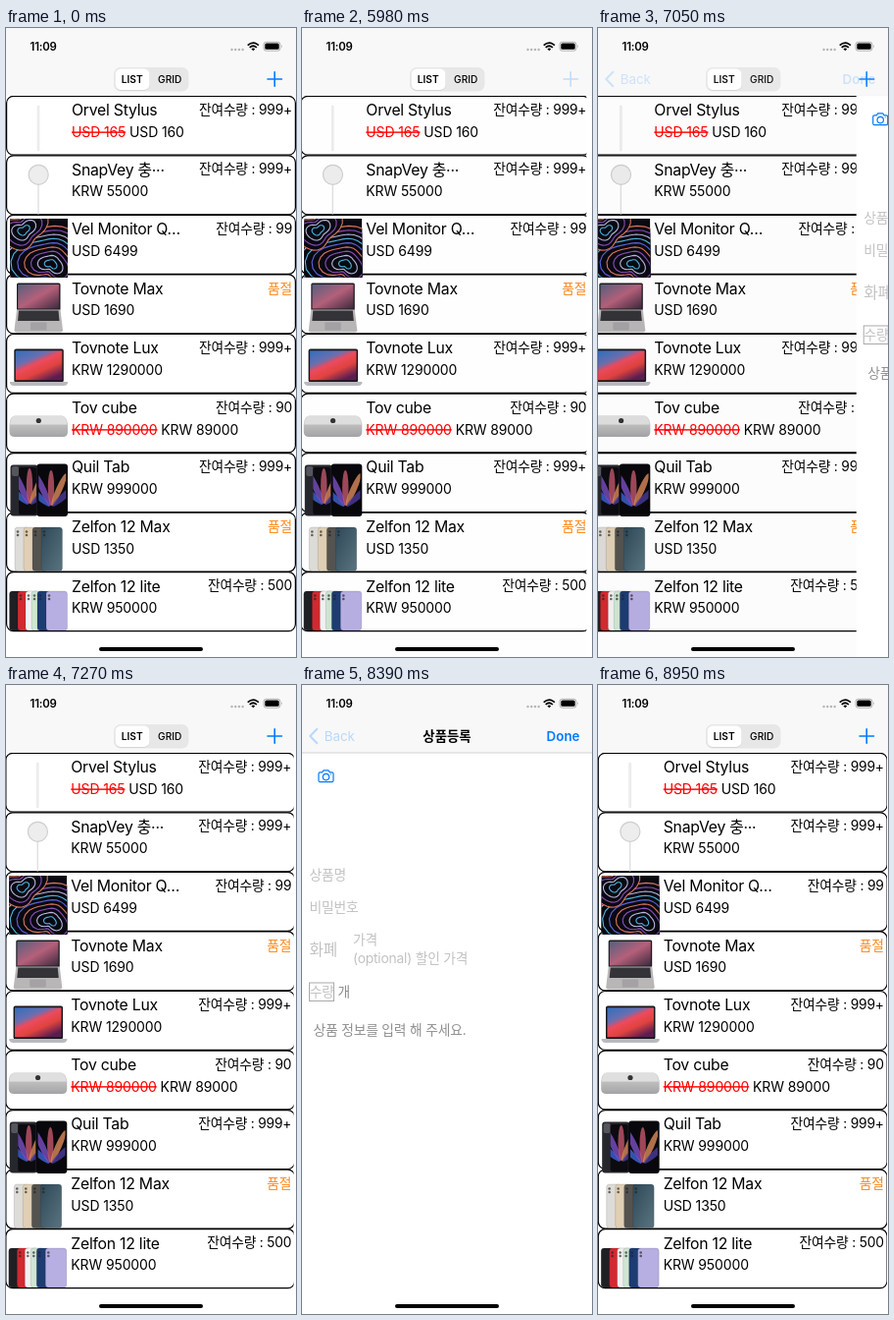
These frames come from a looping animation (296 px wide and 640 px high, 9030 ms). An HTML page:

```html
<!DOCTYPE html>
<html lang="ko">
<head>
<meta charset="utf-8">
<style>
html, body { margin: 0; width: 100%; height: 100%; overflow: hidden; background: #fff; }
svg { display: block; width: 296px; height: 640px; }
text { font-family: Inter, "Noto Sans CJK KR", "Noto Sans CJK", sans-serif; font-size: 13.8px; letter-spacing: -.2px; white-space: pre; }
.name { font-size: 15.8px; letter-spacing: -.25px; }
.price { font-size: 14px; letter-spacing: -.13px; }
.old { fill: #f00; text-decoration: line-through; }
.hint { fill: #c2c2c4; }
.bar { font-size: 13.4px; letter-spacing: 0; }
.seg { font-size: 10.2px; letter-spacing: 0; }
.bold { font-weight: 600; }
</style>
</head>
<body>
<svg viewBox="0 0 296 640">
  <defs>
    <linearGradient id="dusk" x1="0" y1="0" x2="1" y2="1">
      <stop offset="0" stop-color="#56607e"/><stop offset=".5" stop-color="#b5607a"/><stop offset="1" stop-color="#3d2a3e"/>
    </linearGradient>
    <linearGradient id="dawn" x1="0" y1="0" x2=".7" y2="1">
      <stop offset="0" stop-color="#2f6fbe"/><stop offset=".35" stop-color="#6a6fb0"/><stop offset=".5" stop-color="#ee4a5c"/><stop offset=".72" stop-color="#e0433f"/><stop offset="1" stop-color="#5b1d50"/>
    </linearGradient>
    <linearGradient id="sea" x1="0" y1="0" x2="1" y2="1">
      <stop offset="0" stop-color="#2f4858"/><stop offset="1" stop-color="#5a7480"/>
    </linearGradient>
    <linearGradient id="metal" x1="0" y1="0" x2="0" y2="1">
      <stop offset="0" stop-color="#d2d2d2"/><stop offset="1" stop-color="#a4a4a6"/>
    </linearGradient>
    <clipPath id="panel"><rect x="4" y="194" width="59" height="59.5"/></clipPath>
    <clipPath id="tablet"><rect x="33.3" y="445.5" width="28" height="49.5" rx="2"/></clipPath>
    <clipPath id="tabletBack"><rect x="13" y="447" width="18" height="48" rx="2"/></clipPath>
  </defs>

  <rect width="296" height="640" fill="#fff"/>
  <g id="list">
    <g id="rows"></g>
    <g id="photos"></g>
  </g>
  <rect id="dim" y="69" width="296" height="571"/>

  <g id="form">
    <rect y="69" width="296" height="571" fill="#fff"/>
    <g fill="none" stroke="#007aff" stroke-width="1.2" stroke-linejoin="round">
      <path d="M18.5 88.8H20.6L22 86.9H27L28.4 88.8H30.5Q32 88.8 32 90.3V97.2Q32 98.7 30.5 98.7H18.5Q17 98.7 17 97.2V90.3Q17 88.8 18.5 88.8Z"/>
      <circle cx="24.5" cy="93.6" r="3.2"/>
      <path d="M29 91H30"/>
    </g>
    <g class="hint">
      <text x="7.5" y="198">상품명</text>
      <text x="7.5" y="231">비밀번호</text>
      <text x="7.5" y="274.5" style="font-size:15.7px">화폐</text>
      <text x="52" y="264">가격</text>
      <text x="52" y="283">(optional) 할인 가격</text>
      <text x="7.8" y="317">수량</text>
    </g>
    <rect x="7.5" y="303" width="25" height="18.5" fill="none" stroke="#aaa"/>
    <text x="36.5" y="317" fill="#8a8a8a">개</text>
    <text x="11.5" y="356" fill="#8f8f8f">상품 정보를 입력 해 주세요.</text>
  </g>

  <rect width="296" height="69" fill="#f8f8f8"/>
  <path id="rule" d="M0 69H296" stroke="#c8c8c8" stroke-width=".8"/>

  <g id="segment">
    <rect x="110" y="40" width="76.5" height="24.5" rx="7" fill="#e7e7e8"/>
    <rect x="111.3" y="42" width="35.4" height="21.8" rx="5.8" fill="#000" opacity=".1"/>
    <rect x="111.5" y="41.5" width="35" height="21.5" rx="5.6" fill="#fff"/>
    <text class="seg bold" x="128.7" y="56" text-anchor="middle">LIST</text>
    <text class="seg" x="167.3" y="56" text-anchor="middle" font-weight="500">GRID</text>
  </g>
  <path id="plus" d="M267 52H281.5M274.2 44.7V59.3" stroke="#007aff" stroke-width="1.6" stroke-linecap="round"/>
  <g id="back">
    <path d="M15.3 44.8L8.3 52L15.3 59.2" fill="none" stroke="#007aff" stroke-width="2" stroke-linecap="round" stroke-linejoin="round"/>
    <text class="bar" x="22.7" y="56.8" fill="#007aff">Back</text>
  </g>
  <text id="title" class="bar bold" x="148" y="56.8" text-anchor="middle">상품등록</text>
  <text id="done" class="bar bold" x="283.5" y="56.8" text-anchor="end" fill="#007aff">Done</text>

  <text class="bold" x="24.6" y="23" style="font-size:11.4px">11:09</text>
  <g fill="#b4b4b4">
    <circle cx="230.5" cy="22" r="1.2"/><circle cx="234.2" cy="22" r="1.2"/><circle cx="237.9" cy="22" r="1.2"/><circle cx="241.6" cy="22" r="1.2"/>
  </g>
  <g fill="none" stroke="#000" stroke-width="1.7">
    <path d="M246.7 17.7Q252.3 12.5 257.9 17.7M248.7 19.9Q252.3 16.6 255.9 19.9"/>
    <path d="M250.4 21.2Q252.3 19.6 254.2 21.2L252.3 23.2Z" fill="#000" stroke="none"/>
  </g>
  <rect x="263" y="14.3" width="17" height="8.8" rx="2.6" fill="none" stroke="#999" stroke-width=".8"/>
  <rect x="264.3" y="15.6" width="14.4" height="6.2" rx="1.5"/>
  <path d="M281.3 17.2Q282.6 18.7 281.3 20.2Z" fill="#999"/>
  <rect x="95" y="630" width="106" height="4" rx="2"/>
</svg>

<script>
const $ = id => document.getElementById(id);
const TOP = 69.3, PITCH = 60.55, W = 296, LOOP = 9030;

// name, price, stock ("" means sold out), old price
const items = [
  ["Orvel Stylus", "USD 160", "999+", "USD 165"],
  ["SnapVey 충···", "KRW 55000", "999+"],
  ["Vel Monitor Q…", "USD 6499", "99"],
  ["Tovnote Max", "USD 1690", ""],
  ["Tovnote Lux", "KRW 1290000", "999+"],
  ["Tov cube", "KRW 89000", "90", "KRW 890000"],
  ["Quil Tab", "KRW 999000", "999+"],
  ["Zelfon 12 Max", "USD 1350", ""],
  ["Zelfon 12 lite", "KRW 950000", "500"]
];

$("rows").innerHTML = items.map(([name, price, stock, old], i) => {
  const y = TOP + i * PITCH;
  const was = old ? `<tspan class="old">${old}</tspan> ` : "";
  const left = stock ? `잔여수량 : ${stock}` : "품절";
  return `<rect x=".6" y="${y}" width="294.8" height="59.9" rx="7" fill="#fff" stroke="#000" stroke-width="1.2"/>
    <text class="name" x="67" y="${y + 19.8}">${name}</text>
    <text class="price" x="67" y="${y + 41.5}">${was}${price}</text>
    <text x="292" y="${y + 18.6}" text-anchor="end" fill="${stock ? "#000" : "#ff8a1c"}">${left}</text>`;
}).join("");

const box = (x, y, w, h, fill, r = 0, extra = "") =>
  `<rect x="${x}" y="${y}" width="${w}" height="${h}" rx="${r}" fill="${fill}" ${extra}/>`;
const dot = (x, y, r, fill) => `<circle cx="${x}" cy="${y}" r="${r}" fill="${fill}"/>`;

// Nested wobbly rings around one centre
function rings(cx, cy, count, phase) {
  const tones = ["#5a63d8", "#4fb3dc", "#b9b6dc", "#8a4fb8", "#d9755c"];
  let out = "";
  for (let k = 1; k <= count; k++) {
    const points = [];
    for (let a = 0; a < 6.28; a += .2) {
      const r = k * 5 * (1 + .28 * Math.sin(2 * a + phase) + .16 * Math.sin(3 * a - phase));
      points.push((cx + r * Math.cos(a)).toFixed(1) + "," + (cy + r * Math.sin(a)).toFixed(1));
    }
    out += `<polygon points="${points.join(" ")}" fill="#090912" stroke="${tones[k % 5]}" stroke-width="1.1"/>`;
  }
  return out.split("/>").reverse().join("/>").replace(/^\/>/, "") + "/>";
}

// Coloured blades fanning out from the lower corner of a tablet screen
function blades(cx, cy, clip) {
  const tones = ["#3f63d6", "#7b4fc4", "#c2586c", "#dd8a5a", "#4a3a9c"];
  const fan = tones.map((c, i) =>
    `<ellipse cx="${cx}" cy="${cy - 20}" rx="3.2" ry="18" fill="${c}" opacity=".8" transform="rotate(${i * 24 - 48} ${cx} ${cy})"/>`);
  return `<g clip-path="url(#${clip})">${fan.join("")}</g>`;
}

// A fan of phone backs, the last one widest and in front
function phones(y, h, list) {
  return list.map(([x, w, fill]) =>
    box(x, y, w, h, fill, 3, 'stroke="#0003" stroke-width=".6"') +
    dot(x + 3, y + 4.5, 1.3, "#222a") + dot(x + 3, y + 8, 1.3, "#222a")).join("");
}

$("photos").innerHTML = [
  box(32.1, 79, 1.8, 46, "#f1f1f1", .9, 'stroke="#dcdcdc" stroke-width=".5"'),
  `<path d="M33 159V189.5" stroke="#dedede" stroke-width="1.3"/>`,
  `<circle cx="33.2" cy="149.3" r="10" fill="#ededee" stroke="#cfcfd1" stroke-width="1.2"/>`,
  `<g clip-path="url(#panel)">${box(4, 194, 59, 60, "#090912")}${rings(46, 240, 9, 1)}${rings(18, 206, 4, 2.6)}</g>`,
  box(11, 259.5, 44.5, 28, "#1b1b1f", 1.5) + box(12.2, 261, 42, 24.5, "url(#dusk)"),
  `<path d="M11 286.5H55.5L58 307.5Q58 309.5 56 309.5H10.5Q8.5 309.5 8.5 307.5Z" fill="#b9b6b8"/>`,
  `<path d="M13 287.5H53.5L54.5 298H12Z" fill="#343338"/>` + box(25, 299.5, 16.5, 8, "#a5a2a5", 1),
  box(8.3, 326.5, 50.5, 34, "#17171b", 2) + box(9.8, 328.3, 47.5, 30, "url(#dawn)"),
  `<path d="M4 360H63V361.5Q62 364 59 364H8Q5 364 4 361.5Z" fill="#b8bac0"/>`,
  `<path d="M9 394.5H57Q62 395 63 403V411Q63 416 58 416H9Q3.5 416 3.5 411V403Q4 395 9 394.5Z" fill="url(#metal)"/>`,
  `<path d="M9.5 394.5H57Q61 395 62.5 403.5H4Q5 395 9.5 394.5Z" fill="#dfdfdf"/>` + dot(33.3, 399.5, 2.6, "#333"),
  box(4.5, 444.5, 28, 52, "#26272c", 3) + box(6, 446, 7, 10, "#55565d", 2) + box(13, 447, 18, 48, "#0b0b10", 2),
  blades(24, 486, "tabletBack"),
  box(31.5, 443.5, 31.5, 53.5, "#08080c", 3) + blades(46, 488, "tablet"),
  phones(508, 44.5, [[9, 15, "#dddcd8"], [18, 15, "#e0cfb4"], [27, 15, "#55534f"], [36, 21.5, "url(#sea)"]]),
  phones(573, 40, [[3.5, 15, "#1f2024"], [12, 14, "#d12a31"], [20, 14, "#f2f2f2"], [26, 14, "#cfe6d2"], [32, 14, "#1d3c72"], [41, 21.5, "#b7aee2"]])
].join("");

// Moments when the picture is refreshed
const spread = (a, b, n) =>
  Array.from({ length: n }, (_, i) => Math.floor((a + (b - a) * i / (n - 1)) / 10) * 10);
const ticks = [0, 4330, ...spread(5980, 6430, 5), 6580, ...spread(6830, 7270, 5),
  7550, ...spread(7720, 8170, 5), ...spread(8390, 8950, 6)];

// Start time and direction: 1 opens the form, 0 returns to the list
const moves = [[5965, 1], [6780, 0], [7694, 1], [8393, 0]];

function spring(ms) {
  const a = ms * .014;
  const p = 1 - (1 + a) * Math.exp(-a);
  return p > .998 ? 1 : p;
}

function openness(t) {
  const move = moves.filter(m => m[0] <= t).pop();
  if (!move) return 0;
  const p = spring(t - move[0]);
  return move[1] ? p : 1 - p;
}

const clamp = v => Math.max(0, Math.min(1, v));
const fade = (id, a) => $(id).setAttribute("opacity", a.toFixed(3));
const slide = (id, x) => $(id).setAttribute("transform", `translate(${x.toFixed(2)} 0)`);

function draw(now) {
  const time = now % LOOP;
  const t = ticks.filter(k => k <= time).pop();
  const q = openness(t);
  const shown = q ** .75 * clamp(q * 10 - .2), hidden = (1 - q) ** .75;
  const plusDown = (t >= 4330 && t < 6780) || (t >= 7550 && t < 8390);
  const backDown = (t >= 6780 && t < 7694) || t >= 8390;

  slide("list", -.3 * W * q);
  slide("form", W * (1 - q));
  slide("title", 138 * (1 - q));
  fade("dim", .1 * q);
  fade("rule", q);
  fade("segment", hidden);
  fade("plus", hidden * (plusDown ? .22 : 1));
  fade("back", backDown ? Math.min(.25, shown) : shown);
  fade("title", clamp((q - .15) / .65));
  fade("done", shown);
}

const start = performance.now();
function loop() {
  draw(performance.now() - start);
  requestAnimationFrame(loop);
}
loop();
</script>
</body>
</html>
```
